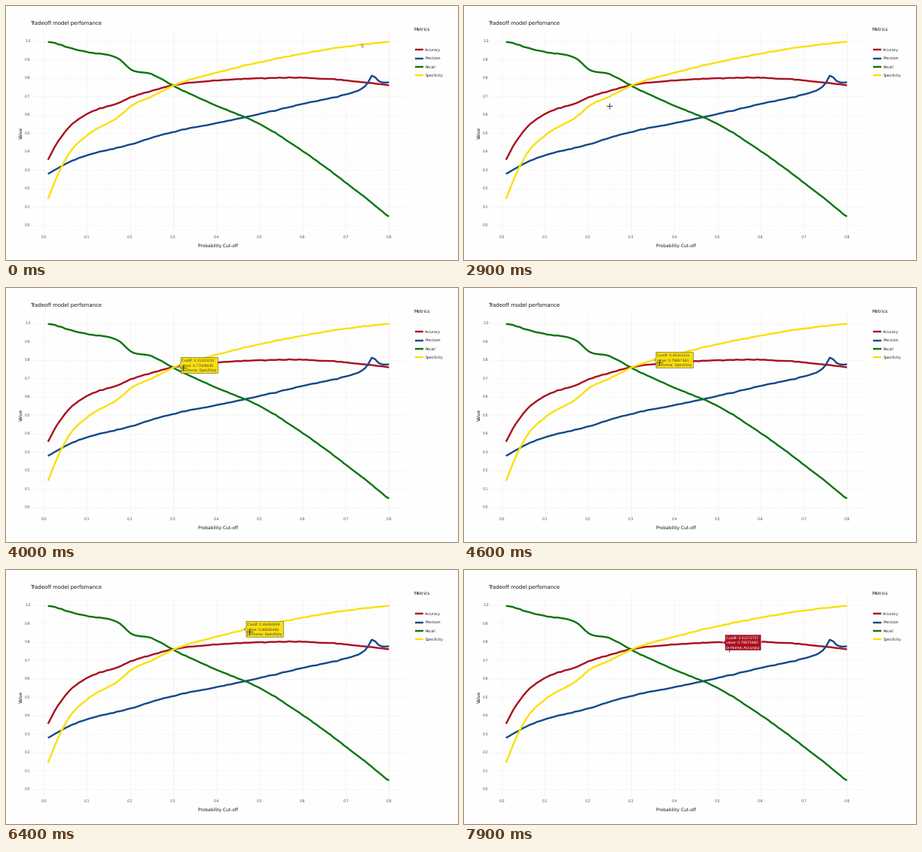
These frames come from a looping animation (600x338 px, 8000 ms). A matplotlib script:

```python
import numpy as np
import matplotlib.pyplot as plt
from matplotlib.animation import FuncAnimation

plt.rcParams["text.hinting"] = "none"
W, H, DPI = 600, 338, 100
FRAMES, STEP = 80, 100
PT = 72 / DPI  # points per pixel
PAPER = "#fefefe"

HOVER_START, RED_START = 3700, 7300


def px(v):
    return 49.5 + 573 * v


def py(v):
    return 292 - 245 * v


def ease(u):
    u = np.clip(u, 0, 1)
    return u * u * (3 - 2 * u)


def hermite(x, xk, vk):
    """Smooth curve through the knots."""
    slope = np.gradient(vk, xk)
    i = np.clip(np.searchsorted(xk, x) - 1, 0, len(xk) - 2)
    h = xk[i + 1] - xk[i]
    u = (x - xk[i]) / h
    s = ease(u)
    return (vk[i] * (1 - s) + vk[i + 1] * s
            + h * u * (1 - u) * (slope[i] * (1 - u) - slope[i + 1] * u))


# Four metrics over 100 cut-offs, each led by a few values
CUT = np.linspace(0.01, 0.8, 100)
KNOTS = np.array([.01, .03, .06, .1, .18, .2, .25, .3, .4, .5, .6, .7, .8])
rng = np.random.default_rng(4)


def metric(*values):
    return hermite(CUT, KNOTS, np.array(values)) + rng.normal(0, 0.0009, CUT.size)


accuracy = metric(.355, .441, .535, .602, .670, .692, .729, .759, .785, .797, .800, .786, .759)
precision = metric(.278, .304, .343, .378, .4245, .4355, .4735, .506, .553, .603, .657, .707, .770)
precision += 0.07 / (1 + ((CUT - 0.762) / 0.011) ** 2)
recall = metric(.9955, .9855, .963, .940, .891, .849, .820, .757, .648, .549, .402, .2305, .045)
specificity = metric(.143, .259, .393, .486, .600, .642, .698, .757, .8265, .884, .9315, .970, .996)

# Readings where the pointer rests
specificity[[38, 50, 57]] = 0.77009030, 0.83301827, 0.86830486
accuracy[63] = 0.79573460

SERIES = [("Accuracy", "#a90f1f", accuracy), ("Precision", "#15488a", precision),
          ("Recall", "#0b7410", recall), ("Specificity", "#fbe00a", specificity)]

# Pointer stops before the labels: ms, x, y
STOPS = np.array([(200, 473, 53), (1000, 236, 129), (1300, 236, 129), (1500, 109, 247),
                  (1700, 117, 257), (2900, 192, 133), (3100, 192, 131), (3700, 231, 109)])
# Data point under the pointer: ms, index
HOVER = np.array([(3700, 37), (4100, 38), (5300, 50), (6400, 57), (6900, 58)])

fig = plt.figure(figsize=(W / DPI, H / DPI), dpi=DPI, facecolor=PAPER)
ax = fig.add_axes([0, 0, 1, 1])
ax.set(xlim=(-0.5, W - 0.5), ylim=(H + 0.5, 0.5))
ax.axis("off")


def line(x, y, color, width, z=2):
    return ax.plot(x, y, color=color, lw=width * PT, zorder=z,
                   solid_capstyle="butt", solid_joinstyle="round")[0]


def label(x, y, text, size, color="#222222", **kw):
    kw = {"family": "DejaVu Sans", "va": "baseline", **kw}
    return ax.text(x, y, text, fontsize=size * PT, color=color, **kw)


LEFT, RIGHT, TOP, BOTTOM = px(-0.0295), px(0.8395), py(1.05), py(-0.05)
MAJOR, MINOR, TICK = "#f3f3f3", "#f9f9f9", "#505050"

for i in range(11):
    y = py(i / 10)
    line([LEFT, RIGHT], [y, y], MAJOR, 0.7, 1)
    if i < 10:
        line([LEFT, RIGHT], [y - 12.25] * 2, MINOR, 0.5, 1)
    label(32.2, y + 1.8, f"{i / 10:.1f}", 4.8, TICK, ha="right")
for i in range(9):
    x = px(i / 10)
    line([x, x], [TOP, BOTTOM], "#ebebeb" if i in (3, 8) else MAJOR, 0.7, 1)
    if i < 8:
        line([x + 28.65] * 2, [TOP, BOTTOM], MINOR, 0.5, 1)
    label(x, 309.2, f"{i / 10:.1f}", 4.8, TICK, ha="center")

label(32, 25.1, "Tradeoff model perfomance", 6.9, "#111111")
label(281.2, 321.4, "Probability Cut-off", 5.85, "#111111", ha="center")
label(19.6, 169, "Value", 5.85, "#111111", rotation=90, ha="center", va="center")
label(541, 33, "Metrics", 5.85, "#111111")

for i, (name, color, values) in enumerate(SERIES):
    line(px(CUT), py(values), color, 2.4, 3 + i * 0.1)
    y = 58.6 + 11.4 * i
    line([542, 553], [y, y], color, 2.4)
    label(555.8, y + 1.7, name, 4.65)

# Hover label
tip = ax.fill([0], [0], lw=0.6 * PT, zorder=6)[0]
rows = [label(0, 0, "", 5.1, family="Liberation Sans", zorder=7) for _ in range(3)]

# Pointer
cross = [line([], [], "#333333", 0.9, 8) for _ in range(2)]
arrow = ax.fill([0], [0], fc="white", ec="#666666", lw=0.6 * PT, zorder=8)[0]
ARROW = np.array([(0, 0), (0, 4.4), (1.6, 5), (2.8, 3.4)])


def show_tip(k, series, width, ink, edge):
    name, color, values = series
    x, y = px(CUT[k]), py(values[k])
    x0, x1 = x + 2.6, x + 2.6 + width
    tip.set_xy([(x, y), (x0, y - 2.6), (x0, y - 10.5), (x1, y - 10.5),
                (x1, y + 10.5), (x0, y + 10.5), (x0, y + 2.6)])
    tip.set(facecolor=color, edgecolor=edge)
    texts = f"Cutoff: {CUT[k]:.8f}", f"value: {values[k]:.8f}", f"performa: {name}"
    for i, (row, text) in enumerate(zip(rows, texts)):
        row.set(text=text, color=ink, position=(x0 + 1.4, y - 4.9 + 6.6 * i))


def wander(t):
    """Eased travel from stop to stop."""
    times = STOPS[:, 0]
    i = np.clip(np.searchsorted(times, t) - 1, 0, len(times) - 2)
    u = ease((t - times[i]) / (times[i + 1] - times[i]))
    return STOPS[i, 1:] * (1 - u) + STOPS[i + 1, 1:] * u


def follow(k, values, dx, dy):
    return px(np.interp(k, range(100), CUT)) + dx, py(np.interp(k, range(100), values)) + dy


def update(n):
    t = n * STEP
    for artist in (tip, *rows):
        artist.set_visible(t >= HOVER_START)

    if t < HOVER_START:
        x, y = wander(t)
    elif t < RED_START:
        k = np.interp(t, *HOVER.T)
        x, y = follow(k, specificity, 6.8, 2.8)
        show_tip(round(k), SERIES[3], 49.3, "#444444", "#555544")
    else:
        k = np.interp(t, [RED_START, 7700], [60, 63])
        x, y = follow(k, accuracy, 8.2, 8.5)
        show_tip(round(k), SERIES[0], 48, "white", "#dddddd")

    plain = t < 300
    arrow.set_visible(plain)
    arrow.set_xy(ARROW + (x - 1.5, y - 2.2))
    for part, (dx, dy) in zip(cross, ((4, 0), (0, 4))):
        part.set_visible(not plain)
        part.set_data([x - dx, x + dx], [y - dy, y + dy])
    return [tip, *rows, arrow, *cross]


anim = FuncAnimation(fig, update, frames=FRAMES, interval=STEP, repeat=True,
                     repeat_delay=0, blit=False)
plt.show()
```
